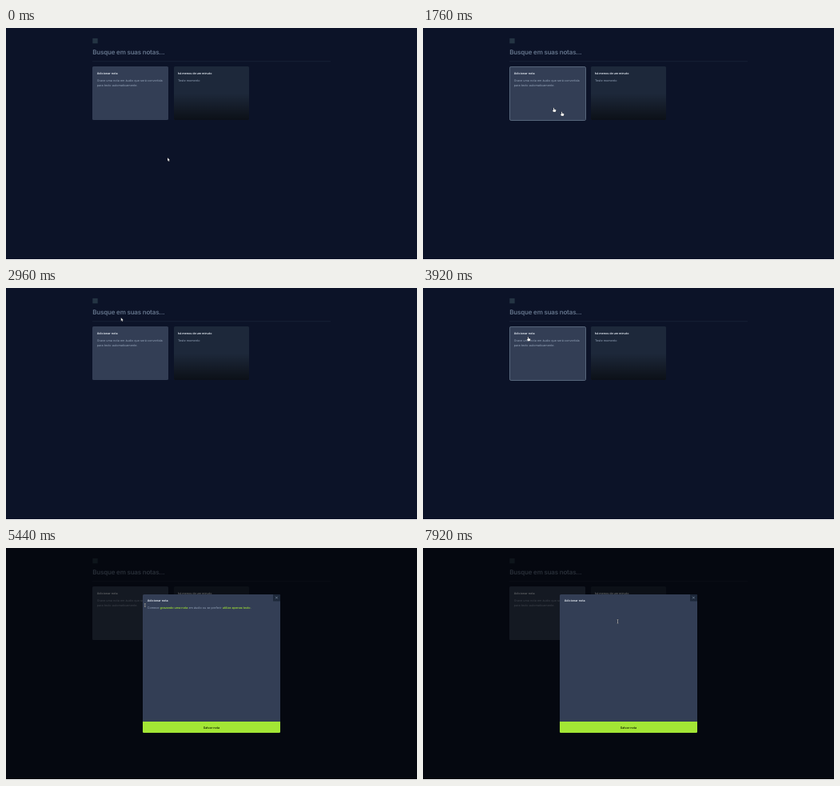
An HTML page that plays this animation: 514x290 px, repeating every 8000 ms.

```html
<!DOCTYPE html>
<html lang="pt-BR">
<head>
<meta charset="utf-8">
<title>Notas</title>
<style>
  html, body { margin: 0; width: 100%; height: 100%; overflow: hidden; background: #0c1328; }
  svg { display: block; width: 100vw; height: 100vh; }
  text { font: 400 3.78px Inter, sans-serif; fill: #94a3b8; text-rendering: geometricPrecision; }
  .title { font-weight: 600; font-size: 3.7px; fill: #e2e8f0; }
  .search { font-size: 8px; font-weight: 600; letter-spacing: -.025em; fill: #64748b; }
  .link { font-weight: 500; fill: #a3e635; }
  .save { font-weight: 600; fill: #1a2e05; text-anchor: middle; }
  .panel { fill: #333e55; }
  .ring { fill: none; stroke: #56657a; }
  .cursor { fill: #fff; stroke: #111; stroke-width: .25; }
</style>
</head>
<body>
<svg viewBox="0 0 514 290">
  <defs>
    <linearGradient id="fade" x2="0" y2="1">
      <stop stop-color="#000" stop-opacity="0"/>
      <stop offset="1" stop-color="#000" stop-opacity=".6"/>
    </linearGradient>
    <path id="arrow" d="M0 0V4.4L1 3.5 1.7 5 2.4 4.7 1.8 3.2H3.1Z"/>
    <path id="hand" d="M-.5 .4Q0-.4.5.4V2L2.5 2.5Q3 2.7 2.9 3.4L2.4 5.4H-.4L-1.7 3.4Q-1.5 2.5-.5 3.3Z"/>
    <path id="beam" d="M-1-2.5H1V-2H.35V2H1V2.5H-1V2H-.35V-2H-1Z"/>
  </defs>

  <rect width="514" height="290" fill="#0c1328"/>
  <rect x="108.3" y="12.9" width="6.4" height="6.4" fill="#243443"/>
  <text class="search" x="108.3" y="33">Busque em suas notas...</text>
  <rect x="108" y="41.8" width="298" height=".27" fill="#334155"/>

  <rect class="panel" x="108" y="48" width="95" height="67" rx="1.6"/>
  <text class="title" x="113.7" y="57.7">Adicionar nota</text>
  <text x="113.7" y="67">Grave uma nota em áudio que será convertida</text>
  <text x="113.7" y="73">para texto automaticamente.</text>

  <rect x="210" y="48" width="94" height="67" rx="1.6" fill="#1d283a"/>
  <text class="title" x="214.9" y="57.7">há menos de um minuto</text>
  <text x="214.9" y="67">Teste momento</text>
  <rect x="210" y="81.7" width="94" height="33.3" rx="1.6" fill="url(#fade)"/>
  <rect class="ring" id="ring" y="48.5" width="95" height="67" rx="1.6"/>

  <g id="dialog">
    <rect width="514" height="289" opacity=".6"/>
    <rect class="panel" x="171" y="58" width="172" height="173" rx="1.6"/>
    <path d="M334 58H341.4Q343 58 343 59.6V66.4H334Z" fill="#1d283a"/>
    <path d="M337 60.7L339.8 63.5M339.8 60.7L337 63.5" stroke="#94a3b8" stroke-width=".55"/>
    <text class="title" x="176.7" y="67.1">Adicionar nota</text>
    <text id="hint" x="176.7" y="76.2">Comece <tspan class="link">gravando uma nota</tspan> em áudio ou se preferir <tspan class="link">utilize apenas texto</tspan>.</text>
    <path d="M171 217H343V229.4Q343 231 341.4 231H172.6Q171 231 171 229.4Z" fill="#a3e635"/>
    <text class="save" x="257" y="225.6">Salvar nota</text>
  </g>

  <rect y="289" width="514" height="1" fill="#fff"/>
  <use class="cursor" id="trail" href="#hand"/>
  <use class="cursor" id="cursor"/>
</svg>
<script>
  const LOOP = 8000, STEP = 80, CLICK = 1760, OPEN = 4320, TYPE = 7200;
  const START = { x: 202, y: 162 };
  // Straight moves; a sweep adds one turn: swing to both sides, lean to the right, rise upwards
  const moves = [
    { from: 960, to: CLICK, x: 173.5, y: 104.5, swing: 136, lean: 86, rise: 120 },
    { from: CLICK, to: 2720, x: 158, y: 76, swing: 137, lean: 148, rise: 54 },
    { from: 2720, to: 2960, x: 143.8, y: 37 },
    { from: 2960, to: 3280, x: 163, y: 39 },
    { from: 3360, to: 3920, x: 131.5, y: 60.9 },
    { from: 4960, to: 5600, x: 188, y: 75 },
    { from: 5760, to: 6640, x: 214, y: 76, lean: 58 },
    { from: 6640, to: 7040, x: 292, y: 76 },
    { from: 7120, to: 7520, x: 270, y: 81 },
    { from: 7600, to: 7920, x: 243.5, y: 91.7 }
  ];
  const $ = id => document.getElementById(id);
  const within = (v, a, b) => v >= a && v <= b;
  const show = (id, on) => $(id).style.display = on ? '' : 'none';

  function place(id, x, y) {
    $(id).setAttribute('x', x);
    $(id).setAttribute('y', y);
  }

  function locate(t) {
    let { x, y } = START;
    for (const { from, to, x: toX, y: toY, swing = 0, lean = 0, rise = 0 } of moves) {
      if (t <= from) break;
      const k = Math.min(1, (t - from) / (to - from));
      const turn = 2 * Math.PI * k;
      const bulge = (1 - Math.cos(turn)) / 2;
      x += (toX - x) * k + swing * Math.sin(turn) + lean * bulge;
      y += (toY - y) * k - rise * bulge;
    }
    return [x, y];
  }

  function shape(t, x, y, card) {
    if (t < OPEN) {
      if (card) return 'hand';
      return within(x, 108, 405) && within(y, 25.7, 35.3) ? 'beam' : 'arrow';
    }
    if (x < 171) return 'arrow';
    if (t >= TYPE) return 'beam';
    return within(x, 192, 228) || within(x, 270, 305) ? 'hand' : 'beam';
  }

  function draw(now) {
    const t = Math.floor(now % LOOP / STEP) * STEP;
    const [x, y] = locate(t);
    const card = t < OPEN && within(y, 48, 115) &&
      [108, 210].find(left => within(x, left, left + 95));
    show('ring', card);
    if (card) $('ring').setAttribute('x', card + .5);
    show('dialog', t >= OPEN);
    show('hint', t < TYPE);
    show('trail', t === CLICK);
    place('trail', x - 10, y - 5);
    place('cursor', x, y);
    $('cursor').setAttribute('href', '#' + shape(t, x, y, card));
  }

  const start = performance.now();
  function tick() {
    draw(performance.now() - start);
    requestAnimationFrame(tick);
  }
  tick();
</script>
</body>
</html>
```
